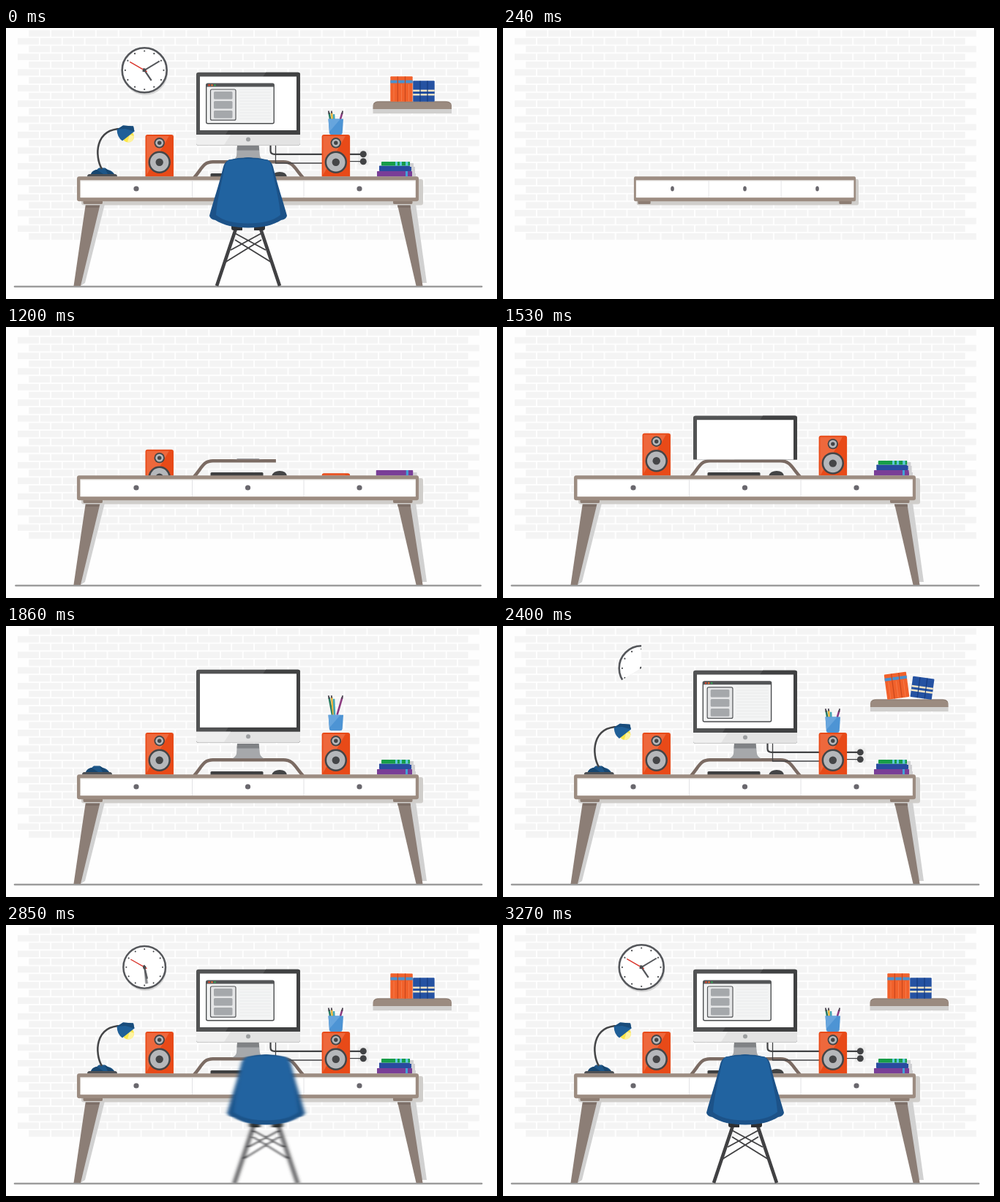
An HTML page that plays this animation: 671x371 px, repeating every 4.38 s.

```html
<!DOCTYPE html>
<html lang="en">
<head>
<meta charset="utf-8">
<title>Desk</title>
<style>
html, body { margin: 0; width: 100%; height: 100%; overflow: hidden; background: #fefefe; }
svg { display: block; }
</style>
</head>
<body>
<svg id="stage" width="671" height="371" viewBox="0 0 671 371" xmlns="http://www.w3.org/2000/svg">
<defs>
  <clipPath id="aboveDesk"><rect width="671" height="203.5"/></clipPath>
  <clipPath id="aboveRiser"><rect width="671" height="181.5"/></clipPath>
  <clipPath id="aboveSpeaker"><rect width="671" height="146.5"/></clipPath>
  <clipPath id="pie"><path id="piePath"/></clipPath>
  <filter id="chairBlur" x="-20%" width="140%"><feGaussianBlur id="chairSoft" stdDeviation="0"/></filter>
  <linearGradient id="orange" x2="1" y2="1">
    <stop offset=".46" stop-color="#f0693c"/><stop offset=".47" stop-color="#e84a18"/>
  </linearGradient>
  <g id="speaker">
    <rect x="-19.2" y="146" width="38.5" height="90" rx="3" fill="#e84a18"/>
    <path d="M-17.5 148H13L-17.5 201Z" fill="#ee683c"/>
    <g fill="#444547">
      <circle cy="157.3" r="7.2"/><circle cy="183.8" r="15.2"/>
      <g fill="#b5b7ba"><circle cy="157.3" r="5.4"/><circle cy="183.8" r="12.7"/></g>
      <circle cy="157.3" r="2.7"/><circle cy="183.8" r="5.2"/>
    </g>
  </g>
</defs>

<g id="bricks" stroke="#f4f4f4" stroke-width="8.7" stroke-dasharray="28.9 1.98"/>
<path id="ground" d="M12 354H650" stroke="#9c9c9c" stroke-width="2.6" stroke-linecap="round"/>

<g id="arch"><path class="draw" id="riser" d="M257 205C268 193 269 183.3 283 183.3H379C393 183.3 395 193 406 205" fill="none" stroke="#7b6b63" stroke-width="4.4"/></g>
<path id="keyboard" d="M279.5 204V200.5Q279.5 199 281 199H350Q351.5 199 351.5 200.5V204Z" fill="#3f4041"/>
<g clip-path="url(#aboveDesk)"><path id="mouse" d="M363 204Q365 197 374 197T384 204Z" fill="#434445"/></g>

<g id="lampBase">
  <path d="M111 203.5Q111 200 114 200H149Q152 200 152 203.5Z" fill="#4d5054"/>
  <path d="M116 200Q118 195 124 194L127 191.5H135L139 194Q145 195 148 200Z" fill="#1d5688"/>
  <path d="M124 194L133 200H116Q118 195 124 194M135 191.5L148 200H139Z" fill="#17466f"/>
</g>
<path class="draw" id="lampArm" d="M131 193C121 176 121 138 158 138" fill="none" stroke="#444547" stroke-width="2.5"/>
<g id="lampHead">
  <circle cx="167" cy="148.5" r="8" fill="#fbe64c"/>
  <path d="M166 156.500A8 8 0 0 0 175 148L169 146Z" fill="#fff3a0"/>
  <path d="M151.500 139L160 133.500L174 134.500L175.500 141.500L159 154.500Q152 150 151.500 139Z" fill="#1f5f98"/>
  <path d="M151.500 139L160 133.500L174 134.500L175.500 141.500L163 138Z" fill="#194c7b"/>
</g>

<g clip-path="url(#aboveRiser)">
  <g id="stand">
    <path d="M316 161H345.500L347 175Q348 179 353 181.500H309Q314 179 315 175Z" fill="#a6a8ab"/>
    <path d="M316 161H345.500L346.200 167.500H315.500Z" fill="#808285"/>
  </g>
</g>
<g fill="none" stroke="#414244">
  <rect id="socket" x="481" y="166.500" width="14.500" height="21.500" rx="2" fill="#ececec" stroke="none"/>
  <path class="draw" id="cableA" d="M361.500 160V168Q361.500 172.800 367 172.800H488" stroke-width="2.2"/>
  <path class="draw" id="cableB" d="M368.500 160V185H432M470 182.700H488" stroke-width="1.3"/>
  <g id="plugs" fill="#414244" stroke="none"><circle cx="488.300" cy="172.800" r="4.500"/><circle cx="488.300" cy="182.700" r="4.500"/></g>
</g>
<g clip-path="url(#aboveRiser)">
  <g id="monitor">
    <rect x="260" y="60.800" width="142" height="100" rx="3" fill="#525354"/>
    <path d="M355 60.800H399Q402 60.800 402 64V146H300Z" fill="#404142"/>
    <path d="M260 146H402V157.500Q402 160.800 399 160.800H263Q260 160.800 260 157.500Z" fill="#e3e3e3"/>
    <path d="M260 146H307L298 160H263Q260 160 260 157Z" fill="#efefef"/>
    <rect x="265" y="66.500" width="132" height="73.500" fill="#fff"/>
    <circle cx="331" cy="152.500" r="3" fill="#9d9fa1"/>
    <g id="window">
      <rect x="273.700" y="76.200" width="92.500" height="54.500" rx="2" fill="#f3f4f4" stroke="#4c4e50" stroke-width="1.400"/>
      <path d="M319 84H362M319 88H362M319 92H362M319 96H362M319 100H362M319 104H362M319 108H362M319 112H362M319 116H362M319 120H362M319 124H362" stroke="#eaebec"/>
      <path d="M273.700 80.500V78Q273.700 76.200 275.500 76.200H364.500Q366.200 76.200 366.200 78V80.500Z" fill="#535557"/>
      <circle cx="277.500" cy="78.300" r="1.200" fill="#e8472a"/><circle cx="281.500" cy="78.300" r="1.200" fill="#ef7030"/><circle cx="285.500" cy="78.300" r="1.200" fill="#34a853"/>
      <rect x="279.500" y="84" width="34.500" height="42.200" rx="2" fill="#e4e5e6" stroke="#55575a" stroke-width="1.200"/>
      <g fill="#a5a8ab"><rect x="284" y="87" width="25.500" height="10.500" rx="1.500"/><rect x="284" y="100" width="25.500" height="10.500" rx="1.500"/><rect x="284" y="113" width="25.500" height="10.500" rx="1.500"/></g>
    </g>
  </g>
</g>

<g clip-path="url(#aboveSpeaker)">
  <g id="pencils" fill="none" stroke-width="2.600">
    <path d="M441.500 116L446 140" stroke="#287c63"/><path d="M445 116L447.500 140" stroke="#e9b43c"/><path d="M448 118L449 140" stroke="#42a6b5"/><path d="M459.500 116L452.500 140" stroke="#8c3a80"/>
    <path d="M440.700 113.500L441.700 118M444.700 113.500L445.200 117M460.200 113.500L459 118" stroke="#4b4550" stroke-width="1.800"/>
  </g>
  <g id="cup">
    <path d="M440.500 124.500H461L459.700 143.500Q459.500 146 457 146H444.500Q442 146 441.800 143.500Z" fill="#4d94d4"/>
    <path d="M440.500 124.500H457L442 142Z" fill="#67a5dd"/>
  </g>
</g>
<g clip-path="url(#aboveDesk)"><use id="speakerL" href="#speaker"/><use id="speakerR" href="#speaker"/></g>

<g id="bookA"><path d="M555 199H560V203.500H555Z" fill="#d0d0d2"/><rect x="507" y="196" width="48" height="7.500" rx=".8" fill="#793e97"/><path d="M546 196H549V203.500H546Z" fill="#42a1d8"/></g>
<g id="bookB"><path d="M554 190H559V199H555V196H554Z" fill="#d0d0d2"/><rect x="510" y="188.500" width="44" height="7.500" rx=".8" fill="#294b9f"/></g>
<g id="bookC"><path d="M552 185H557V190H552Z" fill="#d0d0d2"/><rect x="513" y="183" width="39" height="5.500" rx=".8" fill="#179d48"/><path d="M532 183H535V188.500H532ZM538 183H541V188.500H538ZM546 183H549.500V188.500H546Z" fill="#5bc8dc"/></g>

<g id="desk">
  <g id="legs">
    <g fill="#d1d1d1"><path d="M115 241H135L108 349L102 353H99Z"/><path d="M540 241H560L575 349H568Z"/></g>
    <g fill="#8c7e76"><path d="M109 240H129L102 353H92.500Z"/><path d="M534.500 240H552L569.500 353H560.500Z"/></g>
    <g fill="#7d6f67"><path d="M110 240H128.500L127 246H109Z"/><path d="M534.500 240H552L553 246H535.700Z"/></g>
  </g>
  <rect x="103" y="207" width="467" height="35.500" rx="3" fill="#d0cecb"/>
  <path d="M105.500 237H132V239.500Q132 241 130 241H107.500Q105.500 241 105.500 239.500ZM529 237H555.500V239.500Q555.500 241 553.500 241H531Q529 241 529 239.500Z" fill="#8d7d73"/>
  <rect x="97" y="203.300" width="467" height="34" rx="3" fill="#9c8c81"/>
  <rect x="101.500" y="208.500" width="458.300" height="23.700" fill="#fff"/>
  <path d="M101.500 209H559.800" stroke="#dedbd8"/>
  <path d="M254.500 209V232M407 209V232" stroke="#e2e2e4"/>
  <g fill="#69676d"><circle cx="178" cy="220" r="3.600"/><circle cx="330.500" cy="220" r="3.600"/><circle cx="483" cy="220" r="3.600"/></g>
</g>

<g id="shelf">
  <path d="M501.500 108H609V117H501.500Z" fill="#d0cfce"/>
  <path d="M501.500 111V106Q502 100.500 508 100.500H602Q608.500 100.500 609 106V111Z" fill="#9b8b80"/>
  <path d="M503 104Q505 101 508 101H602Q606 101 608 104" fill="none" stroke="#8a7a70"/>
</g>
<g id="orangeBooks">
  <rect x="525.300" y="66.300" width="30.400" height="34.400" rx="1" fill="#f1612b"/>
  <path d="M525.300 71.500H555.700V75.500H525.300Z" fill="#4b90cd"/>
  <path d="M535.300 66.500V100.700M545.500 66.500V100.700" stroke="#c9481d" stroke-width="1.200"/>
  <path d="M530 77V100M540.500 77V100M550.500 77V100" stroke="#f57a49"/>
</g>
<g id="blueBooks">
  <rect x="556.200" y="72.300" width="29.500" height="28.400" rx="1" fill="#2552a2"/>
  <path d="M556.200 84.500H585.700V92.500H556.200Z" fill="#f0e3c4"/><path d="M556.200 87H585.700V90H556.200Z" fill="#2552a2"/>
  <path d="M566 72.500V100.700M576 72.500V100.700" stroke="#173c7e" stroke-width="1.200"/>
</g>

<g id="clock">
  <g clip-path="url(#pie)">
    <circle cx="1" cy="3" r="31" fill="#d6d6d6"/>
    <circle r="30.500" fill="#fff" stroke="#55575b" stroke-width="2.600"/>
    <g id="ticks" fill="#4a4c4f"/>
    <circle r="2.300" fill="#4a4c4f"/>
  </g>
  <g id="hands">
    <g id="hourHand"></g><g id="minuteHand"></g>
    <path id="redHand" d="M0 4V-23" stroke="#d9342b" stroke-width="1.500"/>
    <circle r="2.300" fill="#4a4c4f"/>
  </g>
</g>

<g id="chair">
  <g fill="none" stroke="#414143">
    <path d="M313 290L363 321M311 280L355 304M349 290L299 321M351 280L307 304" stroke-width="1.900"/>
    <path d="M314 275L288 353M348 275L374 353" stroke-width="4.600"/>
  </g>
  <path d="M308 270H323V277H311Q308 277 308 274ZM339 270H354V274Q354 277 351 277H339Z" fill="#2f3032"/>
  <path d="M304 181Q331 174 358 181Q363 183 365 190C371 215 379 238 384 257Q383 262 376 263C365 270 350 273.500 331 273.500C312 273.500 297 270 286 263Q279 262 278 257C283 238 291 215 297 190Q299 183 304 181Z" fill="#1c5288"/>
  <path d="M304 181Q331 174 358 181Q361 183 363 190C368 215 374 238 375 256C365 264 350 267.500 331 267.500C312 267.500 297 264 287 256C288 238 294 215 299 190Q301 183 304 181Z" fill="#2163a0"/>
  <path d="M304 181Q331 174 358 181Q331 176.500 304 181" fill="#1c5288" stroke="#1c5288" stroke-width=".6"/>
</g>
</svg>
<script>
const LOOP = 4380, SETTLED = 3270;
const $ = id => document.getElementById(id);
const move = (id, value) => $(id).setAttribute('transform', value);
const ramp = (t, a, b) => Math.min(1, Math.max(0, (t - a) / (b - a)));

// Decaying wobble that follows the arrival of a part.
const wobble = s => s > 0 ? Math.sin(8 * Math.PI * s) * Math.exp(-8 * s) : 0;
function spring(t, a, b, amp = 0.05) {
  if (t >= SETTLED) return 1;
  return ramp(t, a, b) + amp * 1000 / (b - a) * wobble((t - b) / 1000);
}
const scaleAt = (id, x, y, sx, sy = sx) =>
  move(id, `translate(${x} ${y}) scale(${sx} ${sy}) translate(${-x} ${-y})`);
const rise = (id, distance, p, x = 0) => move(id, `translate(${x} ${distance * (1 - p)})`);

function draw(id, p) {
  const path = $(id);
  path.style.visibility = p > 0 ? 'visible' : 'hidden';
  path.setAttribute('stroke-dasharray', p < 1 ? `${p} 2` : 'none');
}

function build() {
  let rows = '', dots = '';
  for (let i = 0; i < 27; i++) {
    const x = i % 2 ? 16 : 31.2, y = 7.5 + i * 10.69;
    rows += `<path d="M${x} ${y}h616.500"/>`;
  }
  for (let i = 0; i < 12; i++) dots += `<circle cy="-26.300" r="1.100" transform="rotate(${i * 30})"/>`;
  $('bricks').innerHTML = rows;
  $('ticks').innerHTML = dots;
  document.querySelectorAll('.draw').forEach(p => p.setAttribute('pathLength', 1));
}

// A fast hand becomes a fan of faint copies.
function hand(id, length, width, angleAt, t) {
  const first = angleAt(t), sweep = angleAt(t + 15) - first;
  const copies = Math.abs(sweep) > 1 ? 7 : 1;
  let out = '';
  for (let i = 0; i < copies; i++) {
    out += `<path d="M0 3V${-length}" stroke="#55575b" stroke-width="${width}" opacity="${copies > 1 ? 0.25 : 1}" transform="rotate(${first + sweep * i / copies})"/>`;
  }
  $(id).innerHTML = out;
}

const chairX = t => -391 * (1 - spring(t, 2606, 2838));
const minuteAngle = t => 59 + 240 * (1 - ramp(t, 2690, 3290)) ** 2.3;
const hourAngle = t => 146 + 50 * (1 - ramp(t, 2690, 3250)) ** 2.5;

function update(t) {
  scaleAt('desk', 330.5, 220, spring(t, 30, 355, 0.075), 1);
  scaleAt('legs', 330.5, 240, 1, ramp(t, 535, 735));
  $('legs').style.visibility = t > 530 ? 'visible' : 'hidden';
  scaleAt('ground', 331, 354, spring(t, 535, 735), 1);

  draw('riser', ramp(t, 1020, 1270));
  scaleAt('keyboard', 315.5, 201, ramp(t, 1060, 1170), 1);
  rise('mouse', 8, ramp(t, 1090, 1180));
  rise('speakerL', 58, spring(t, 1095, 1265, 0.035), 209.7);
  rise('speakerR', 58, spring(t, 1190, 1360, 0.035), 450.8);
  scaleAt('bookA', 531, 203, spring(t, 1050, 1150, 0.008), 1);
  scaleAt('bookB', 532, 196, spring(t, 1210, 1320, 0.01), 1);
  scaleAt('bookC', 532, 188, spring(t, 1310, 1420, 0.01), 1);

  scaleAt('stand', 331, 181.5, 1, Math.min(1, spring(t, 1190, 1370)));
  rise('monitor', 122, spring(t, 1315, 1745, 0.045));
  rise('cup', 25, spring(t, 1680, 1820, 0.025));
  rise('pencils', 36, spring(t, 1735, 1820, 0.07));
  scaleAt('window', 320, 104, spring(t, 1960, 2110, 0.015));

  move('lampBase', `translate(${79 * (1 - spring(t, 1650, 1845))} 0)`);
  $('lampBase').style.visibility = t > 1655 ? 'visible' : 'hidden';
  draw('lampArm', ramp(t, 1930, 2110));
  scaleAt('lampHead', 156, 139, spring(t, 2080, 2210, 0.02));

  draw('cableA', ramp(t, 1900, 2110));
  draw('cableB', ramp(t, 1940, 2150));
  scaleAt('socket', 488.3, 177.5, spring(t, 2060, 2160, 0.015));
  scaleAt('plugs', 488.3, 177.5, spring(t, 2080, 2180, 0.015));

  scaleAt('shelf', 555.3, 106, spring(t, 1960, 2173, 0.022), 1);
  const tilt = t < SETTLED ? 14 * Math.exp(-ramp(t, 2370, 3370) * 8) * Math.sin(Math.max(0, t - 2370) * 0.025) : 0;
  const grow = ramp(t, 2220, 2350);
  move('orangeBooks', `rotate(${-tilt} 526 101) translate(0 ${101 * (1 - grow)}) scale(1 ${grow})`);
  move('blueBooks', `rotate(${tilt} 585 101) translate(0 ${101 * (1 - grow)}) scale(1 ${grow})`);

  const wipe = ramp(t, 2272, 2655) * 359.99, a = wipe * Math.PI / 180;
  $('piePath').setAttribute('d', wipe > 359 ? 'M-60-60H60V60H-60Z' :
    `M0 0V-60A60 60 0 ${wipe > 180 ? 1 : 0} 0 ${-60 * Math.sin(a)} ${-60 * Math.cos(a)}Z`);
  const clockScale = t < SETTLED ? 1 + 0.27 * wobble((t - 2655) / 1000) : 1;
  move('clock', `translate(189.200 57.800) scale(${clockScale})`);
  $('hands').style.visibility = t > 2690 ? 'visible' : 'hidden';
  hand('minuteHand', 24, 1.9, minuteAngle, t);
  hand('hourHand', 17, 2.3, hourAngle, t);
  move('redHand', `rotate(${-60 - 70 * (1 - ramp(t, 2690, 2860)) ** 2})`);

  const x = chairX(t), speed = Math.abs(chairX(t + 1) - x);
  const blurred = speed > 0.1 && t < SETTLED - 2;
  move('chair', `translate(${x} 0)`);
  $('chairSoft').setAttribute('stdDeviation', `${speed * 1.7} 0`);
  if (blurred) $('chair').setAttribute('filter', 'url(#chairBlur)');
  else $('chair').removeAttribute('filter');
}

build();
const start = performance.now();
function frame() {
  const t = (performance.now() - start) % LOOP;
  update(t < 30 ? LOOP - 1 : t);
  requestAnimationFrame(frame);
}
frame();
</script>
</body>
</html>
```
